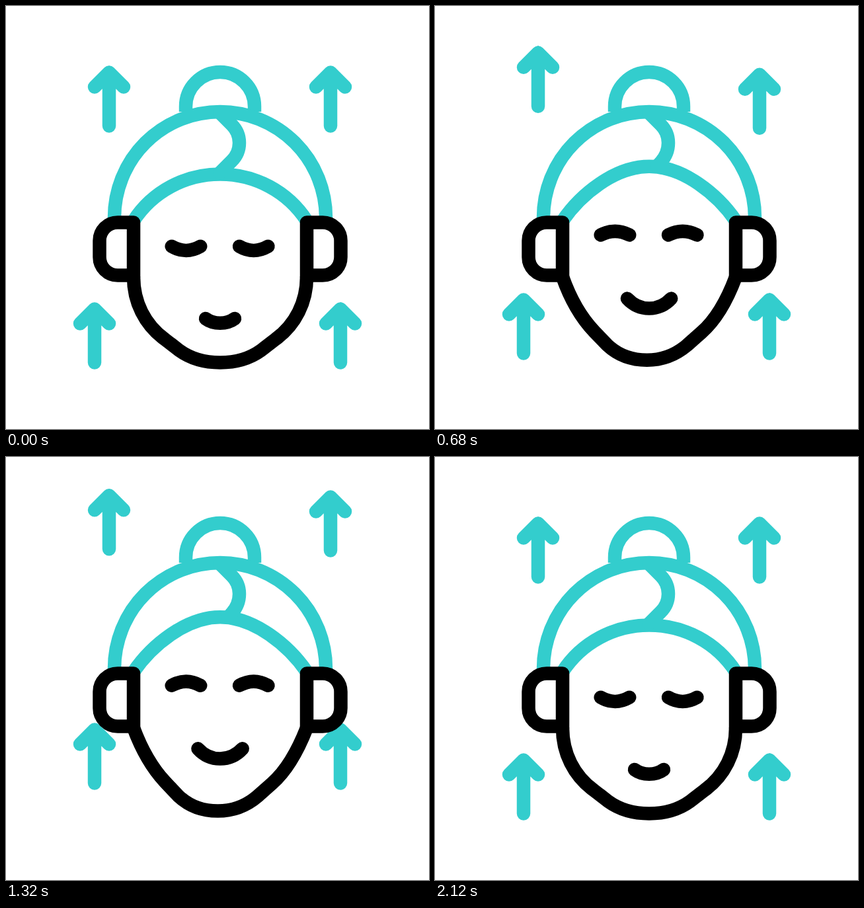
These frames come from a looping animation (640 px wide and 640 px high, 2.4 s). An HTML page:

```html
<!DOCTYPE html>
<html lang="en">
<head>
<meta charset="utf-8">
<title>Face lift</title>
<style>
  html, body { margin: 0; height: 100%; overflow: hidden; background: #fff; }
  svg { display: block; width: 100%; height: 100%; }
</style>
</head>
<body>
<svg viewBox="0 0 640 640" fill="none" stroke-width="20.5" stroke-linecap="round" stroke-linejoin="round">
  <defs>
    <path id="arrow" d="M-22 22.5L0 .5L22 22.5M0 .5V81.5"/>
    <path id="ear" d="M193 410V327.5H169a27.5 27.5 0 0 0 -27.5 27.5V380a27.5 27.5 0 0 0 27.5 27.5H193"/>
  </defs>
  <g id="arrows" stroke="#33cdcd"></g>
  <g id="hair" stroke="#33cdcd">
    <path stroke-linecap="butt" d="M272 160V152A52 52 0 0 1 376 152V160"/>
    <path d="M164 320A160 160 0 0 1 484 320"/>
  </g>
  <g id="face" stroke="#000">
    <use href="#ear"/>
    <use href="#ear" transform="translate(648) scale(-1 1)"/>
  </g>
</svg>
<script>
const LOOP = 2400;
const SVG = 'http://www.w3.org/2000/svg';

function add(parent, tag, attrs) {
  const el = document.createElementNS(SVG, tag);
  for (const name in attrs) el.setAttribute(name, attrs[name]);
  return document.getElementById(parent).appendChild(el);
}

const clamp = x => Math.min(1, Math.max(0, x));
const ease = x => x * x * (3 - 2 * x);
const ramp = (t, from, to) => ease(clamp((t - from) / (to - from)));

// Arrows share one bobbing motion, each with its own delay.
const bobTimes = [0, 430, 835, 1250, 1657, 1997];
const bobShifts = [0, -46, 27, -46, 27, 0];

function bob(t) {
  let y = 0;
  for (let i = 1; i < bobTimes.length; i++)
    y += (bobShifts[i] - bobShifts[i - 1]) * ramp(t, bobTimes[i - 1], bobTimes[i]);
  return y;
}

const arrows = [[156, 100, 127], [491, 100, 0], [134, 458, 65], [506, 458, 65]]
  .map(([x, y, delay]) => ({ x, y, delay, el: add('arrows', 'use', { href: '#arrow' }) }));

// Each morph: group, calm path, smiling path.
const eye = (x, y, bend) => `M${x} ${y}Q${x + 21.7} ${bend} ${x + 43.5} ${y}`;
const morphs = [
  ['hair',
    'M193 325C221.8 280.7 271.2 254.5 324 254.5C376.8 254.5 426.2 280.7 455 325',
    'M193 325C220 286 272 240.5 324 240.5C376 240.5 428 286 455 325'],
  ['hair',
    'M324 162L341.7 179.7C349 187 353 197 353 207C353 217 349 227 341.7 234.3L324 252',
    'M324 162L341.7 179.7C349 187 353 197 353 207C353 218 349 228 342 236L338 241'],
  ['face',
    'M193 410C193 448 210 482 240 504L262 521C280 534 302 539.5 324 539.5C346 539.5 368 534 386 521L408 504C438 482 455 448 455 410',
    'M193 410C207 442 221 467 241 490L260 511C277 528 296 535 320 535C344 535 364 526 380 512L402 492C424 472 441 440 455 410'],
  ['face', eye(250.7, 363.7, 376.3), eye(250.7, 343, 327)],
  ['face', eye(353, 363.7, 376.3), eye(353, 343, 327)],
  ['face',
    'M302 473C314 482 334 482 346 473',
    'M288.7 436.5C308 458.5 340 458.5 359.5 436.5']
].map(([group, calm, smile]) => ({ calm, smile: smile.match(/[\d.]+/g), el: add(group, 'path', {}) }));

function blend({ calm, smile }, p) {
  let i = 0;
  return calm.replace(/[\d.]+/g, n => (+n + (smile[i++] - n) * p).toFixed(2));
}

function draw(now) {
  const t = now % LOOP;
  for (const { x, y, delay, el } of arrows)
    el.setAttribute('transform', `translate(${x} ${y + bob(t - delay)})`);
  const smile = ramp(t, 200, 850) - ramp(t, 1200, 1735);
  for (const m of morphs) m.el.setAttribute('d', blend(m, smile));
}

const start = performance.now();
function tick() {
  draw(performance.now() - start);
  requestAnimationFrame(tick);
}
tick();
</script>
</body>
</html>
```
